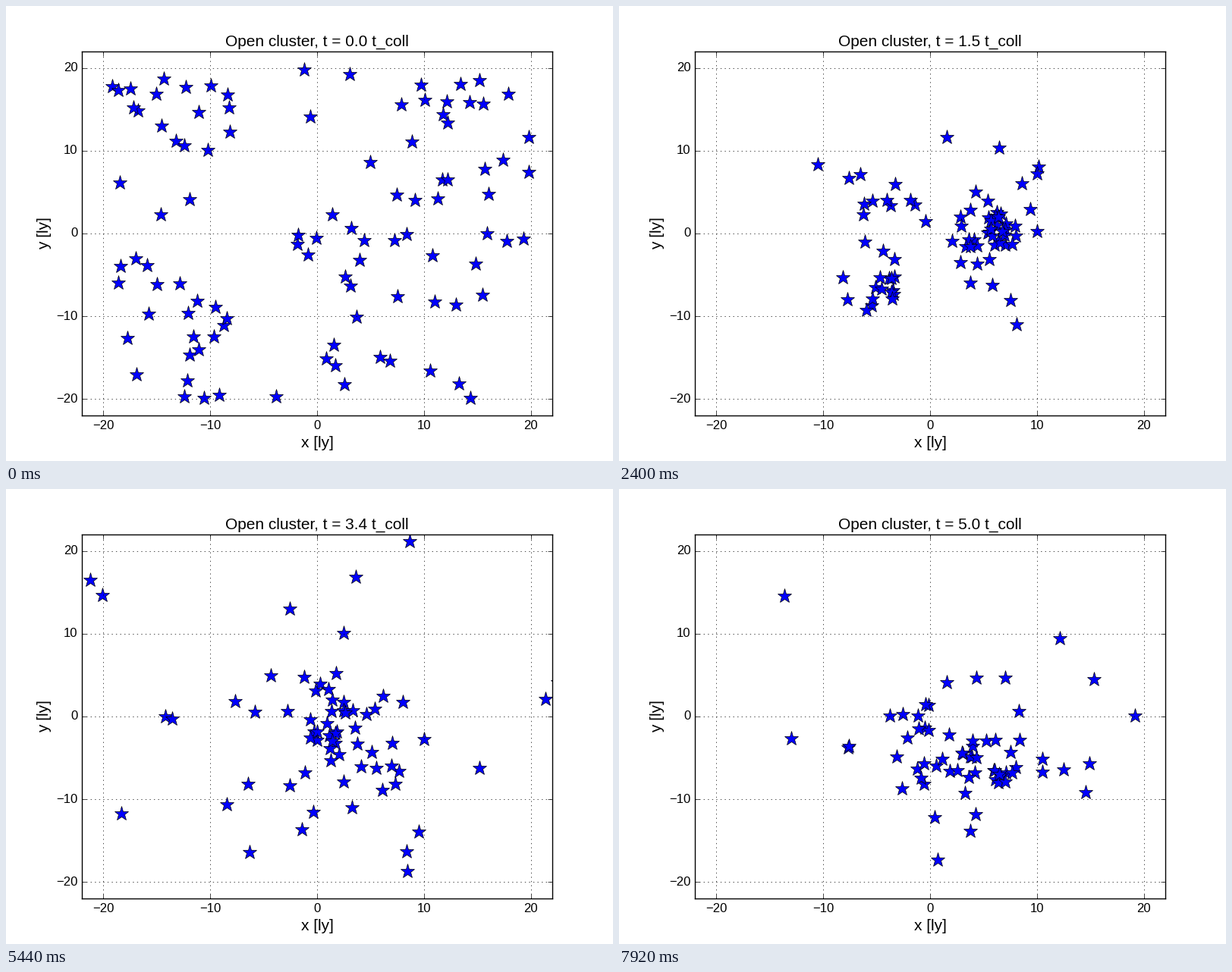
A matplotlib script that plays this animation: 800 px wide and 600 px high, repeating every 8000 ms.

```python
import matplotlib.pyplot as plt
import numpy as np
from matplotlib.animation import FuncAnimation

FRAMES = 100
T_END = 5.0              # in collapse times
SUBSTEPS = 10
N = 100
SIZE = 20.0              # half width of the starting cube, ly
SOFTENING = 0.2
# Pull of one star, scaled so that a uniform sphere of this size collapses at t = 1
PULL = np.pi ** 2 * SIZE ** 3 / 8 / N
DRIFT = (0.8, -0.3, 0)   # slow motion of the whole cluster
PAIRS_FLUNG = 11
FLING_SPAN = (0.1, 0.45)
FLING_SPEED = 80

rng = np.random.default_rng(12)


def acceleration(pos):
    gap = pos[None] - pos[:, None]
    dist2 = (gap ** 2).sum(axis=2) + SOFTENING ** 2
    return PULL * (gap / dist2[..., None] ** 1.5).sum(axis=1)


def fling_closest(pos, vel, free):
    """Throw the closest bound pair apart, as after a near collision."""
    ids = np.flatnonzero(free)
    gap = np.linalg.norm(pos[ids, None] - pos[None, ids], axis=2)
    np.fill_diagonal(gap, np.inf)
    a, b = ids[list(np.unravel_index(gap.argmin(), gap.shape))]
    angle = rng.uniform(0, 2 * np.pi)
    kick = FLING_SPEED * np.array([np.cos(angle), np.sin(angle), 0])
    vel[a], vel[b] = kick, -kick
    free[[a, b]] = False


def simulate():
    """Cold collapse by leapfrog steps; returns x and y for every frame."""
    steps = (FRAMES - 1) * SUBSTEPS
    dt = T_END / steps
    flings = (np.linspace(*FLING_SPAN, PAIRS_FLUNG) / dt).astype(int)

    pos = rng.uniform(-SIZE, SIZE, (N, 3))
    vel = np.tile(np.array(DRIFT, float), (N, 1))
    free = np.ones(N, bool)
    acc = acceleration(pos)
    path = [pos[:, :2].copy()]
    for step in range(1, steps + 1):
        if step in flings:
            fling_closest(pos, vel, free)
        vel += acc * dt / 2
        pos += vel * dt
        acc = acceleration(pos)
        vel += acc * dt / 2
        if step % SUBSTEPS == 0:
            path.append(pos[:, :2].copy())
    return path


path = simulate()

plt.style.use("classic")
plt.rcParams.update({
    "font.family": "Liberation Sans",
    "figure.facecolor": "white",
    "axes.titlesize": 15,
    "axes.labelsize": 15,
    "xtick.labelsize": 12,
    "ytick.labelsize": 12,
})
fig = plt.figure(figsize=(8, 6), dpi=100)
ax = fig.add_axes([0.125, 0.1, 0.775, 0.8])
ticks = range(-20, 21, 10)
ax.set(xlim=(-22, 22), ylim=(-22, 22), xticks=ticks, yticks=ticks)
ax.set_xlabel("x [ly]")
ax.set_ylabel("y [ly]", labelpad=4)
ax.grid(True)
stars, = ax.plot([], [], "b*", markersize=14, markeredgewidth=0.5)
title = ax.set_title("")


def draw(frame):
    stars.set_data(*path[frame].T)
    time = T_END * frame / (FRAMES - 1)
    title.set_text(f"Open cluster, t = {time:.1f} t_coll")
    return stars, title


anim = FuncAnimation(fig, draw, frames=FRAMES, interval=80, repeat=True)
plt.show()
```
